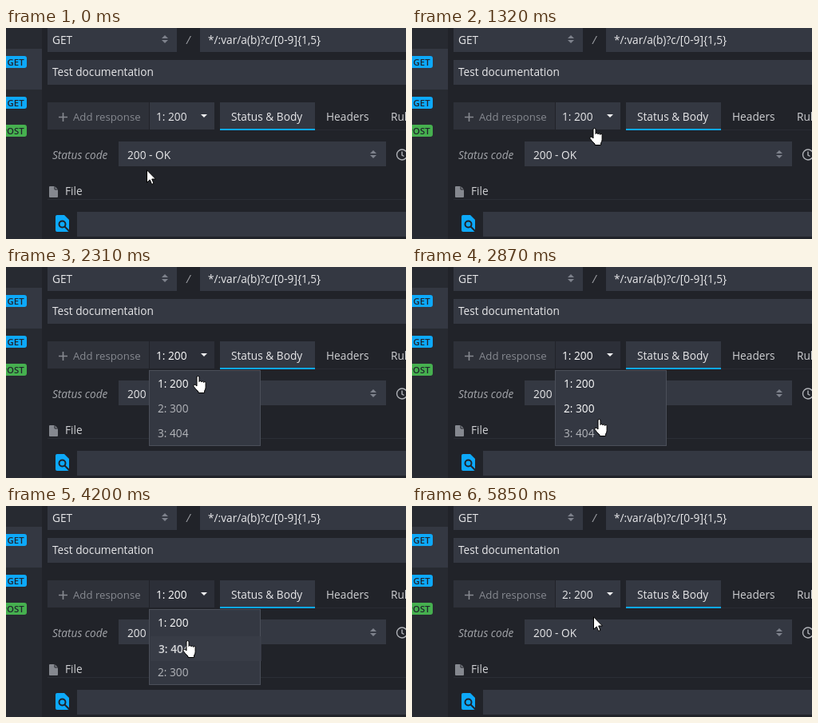
Write an HTML page that moves like this. It is 501 by 264 pixels and loops after 7160 ms.

```html
<!DOCTYPE html>
<html lang="en">
<head>
<meta charset="utf-8">
<title>Reordering responses</title>
<style>
  html, body { margin: 0; width: 100%; height: 100%; overflow: hidden; background: #212329; }
  svg { display: block; width: 501px; height: 264px; }
  text { font: 13.7px "Open Sans", "Noto Sans", sans-serif; fill: #e8e8ea; white-space: pre; }
  .field { fill: #343842; }
  .muted { font-size: 13.2px; fill: #868990; }
  .slanted { font-style: italic; fill: #a2a4a9; }
  .tab { fill: #cfd0d3; }
  .badge { font-size: 11.4px; font-weight: 600; fill: #20242c; text-anchor: end; }
  .row text { fill: #b4b6bb; }
  .row.lit text, #label.lit { fill: #fff; }
  #mirror text { fill: #fff; font-weight: 600; }
  .cursor { fill: #fff; stroke: #000; stroke-linejoin: round; }
</style>
</head>
<body>
<svg viewBox="0 0 501 264">
  <defs>
    <path id="sort" d="M0 4L4 0L8 4ZM0 6H8L4 10Z" fill="#7e828c"/>
  </defs>

  <!-- sidebar -->
  <rect width="45" height="264" fill="#272a31"/>
  <rect y="26" width="45" height="51" fill="#343842"/>
  <rect x="-8" y="35" width="34" height="15" rx="3" fill="#0da9fa"/>
  <rect x="-8" y="86" width="34" height="15" rx="3" fill="#0da9fa"/>
  <rect x="-16" y="121" width="42" height="15" rx="3" fill="#46b04f"/>
  <text class="badge" x="22.600" y="46.500">GET</text>
  <text class="badge" x="22.600" y="97.500">GET</text>
  <text class="badge" x="22.600" y="132.500">POST</text>

  <!-- route -->
  <rect class="field" x="52" y="0" width="162" height="30"/>
  <text x="58" y="20">GET</text>
  <use href="#sort" x="195" y="9"/>
  <text class="slanted" x="226" y="20">/</text>
  <rect class="field" x="243" y="0" width="258" height="30"/>
  <text x="253" y="20">*/:var/a(b)?c/[0-9]{1,5}</text>
  <rect class="field" x="52" y="40" width="449" height="31"/>
  <text x="58" y="60">Test documentation</text>

  <!-- responses and tabs -->
  <rect x="52" y="93" width="127" height="34" fill="#2e3139"/>
  <path d="M66 111.500H77M71.500 106V117" stroke="#868990" stroke-width="1.600"/>
  <text class="muted" x="84" y="116">Add response</text>
  <rect id="toggle" x="180" y="93" width="81" height="34"/>
  <text id="label" x="188" y="116"></text>
  <path d="M244 108H252L248 112Z" fill="#f2f2f3"/>
  <path d="M387 127.500H501" stroke="#292c33"/>
  <rect class="field" x="268" y="93" width="119" height="33"/>
  <rect x="268" y="126" width="119" height="2" fill="#0da9fa"/>
  <text x="282" y="116" fill="#fff">Status &amp; Body</text>
  <text class="tab" x="401" y="116">Headers</text>
  <text class="tab" x="482" y="116">Rules</text>

  <!-- status -->
  <text class="slanted" x="58" y="164">Status code</text>
  <rect class="field" x="141" y="142" width="335" height="31"/>
  <text x="152" y="164">200 - OK</text>
  <use href="#sort" x="456" y="153"/>
  <g fill="none" stroke="#b0b2b7" stroke-width="1.400">
    <circle cx="496" cy="158.500" r="6.500"/>
    <path d="M496 154.500V159L498.500 160.500"/>
  </g>

  <!-- file -->
  <path d="M54 199a1 1 0 0 1 1-1H61L65 202V211a1 1 0 0 1-1 1H55a1 1 0 0 1-1-1Z" fill="#85888f"/>
  <path d="M61 198V202H65" fill="none" stroke="#212329"/>
  <text class="tab" x="74" y="209">File</text>
  <path d="M52 214.500H501" stroke="#2b2e35"/>
  <path d="M62 236a2 2 0 0 1 2-2H73L79 240V253a2 2 0 0 1-2 2H64a2 2 0 0 1-2-2Z" fill="#0da9fa"/>
  <g fill="none" stroke="#212329" stroke-width="2">
    <circle cx="70.500" cy="245.500" r="4"/>
    <path d="M73.500 248.500L79 254"/>
  </g>
  <rect class="field" x="89" y="230" width="412" height="31"/>

  <g id="menu">
    <rect x="179.500" y="129.500" width="139" height="94" fill="#343842" stroke="#4b4f59"/>
    <g class="row"><text x="10" y="21">1: 200</text></g>
    <g class="row"><text x="10" y="21">2: 300</text></g>
    <g class="row"><text x="10" y="21">3: 404</text></g>
    <g id="mirror" opacity=".8"><rect width="139" height="31" fill="#393d48"/><text x="10" y="21">3: 404</text></g>
  </g>

  <path id="arrow" class="cursor" d="M.5 .8V16.300L4.200 12.900L6.600 18.500L9 17.400L6.700 12H11.500Z"/>
  <path id="hand" class="cursor" d="M-1 13V2a1.500 1.500 0 0 1 3 0V7.500a1.500 1.500 0 0 1 2.900 .4a1.400 1.400 0 0 1 2.700 .6a1.300 1.300 0 0 1 2.500 .8V14.500q0 2.500-1.500 4.500V21.500H1V20Q-2.500 17-5 13.300q-.7-2 .9-2.200q1.300 0 3.100 1.900Z"/>
</svg>
<script>
const LOOP = 7160, OPEN = 1660, DRAG = 3650, CLOSE = 5530;
const ROW = 31, TOP = 130, LEFT = 180, GRAB = { x: 226, y: 197 };

// Pointer moves in steps: [first step ms, last step ms, steps, x, y]
const moves = [
  [100, 780, 7, 198, 145],
  [880, 880, 1, 208, 139],
  [1000, 1440, 5, 242, 116],
  [2090, 2770, 7, 235, 185],
  [2870, 2870, 1, 234, 190],
  [2990, 3310, 4, 228, 209],
  [3540, 3650, 2, GRAB.x, GRAB.y],
  [3760, 4200, 5, 227, 168],
  [4300, 4980, 7, 228, 138],
  [CLOSE, CLOSE, 1, 228, 138],
  [5850, 5850, 1, 227, 138],
];

const $ = id => document.getElementById(id);
const rows = [...document.querySelectorAll('.row')];
const place = (el, x, y) => el.setAttribute('transform', `translate(${x} ${y})`);
const show = (el, on) => el.setAttribute('visibility', on ? 'inherit' : 'hidden');

function pointerAt(t) {
  let x = 176, y = 177;
  for (const [start, end, steps, toX, toY] of moves) {
    if (t < start) break;
    const done = end > start ? Math.floor((t - start) / (end - start) * (steps - 1) + 0.01) + 1 : steps;
    const p = Math.min(1, done / steps);
    x += (toX - x) * p;
    y += (toY - y) * p;
  }
  return { x: Math.round(x), y: Math.round(y) };
}

function render(t) {
  const { x, y } = pointerAt(t);
  const open = t >= OPEN && t < CLOSE;
  const dragging = open && t >= DRAG;

  $('label').textContent = t < CLOSE ? '1: 200' : '2: 200';
  $('label').classList.toggle('lit', open);
  $('toggle').setAttribute('fill', open ? '#2c2f38' : '#343842');
  show($('menu'), open);

  // The dragged row trades places once the pointer passes a neighbour's middle
  const order = !dragging || y >= TOP + 1.5 * ROW ? [0, 1, 2]
    : y >= TOP + 0.5 * ROW ? [0, 2, 1] : [2, 0, 1];
  const hovered = Math.floor((y - TOP) / ROW);
  order.forEach((item, slot) => {
    const row = rows[item];
    place(row, LEFT, TOP + slot * ROW);
    row.classList.toggle('lit', item === 0 || (!dragging && slot === hovered));
    row.setAttribute('opacity', dragging && item === 2 ? 0.2 : 1);
  });
  show($('mirror'), dragging);
  place($('mirror'), LEFT + x - GRAB.x, TOP + 2 * ROW + y - GRAB.y);

  const pointing = t < CLOSE && (open || y < 127);
  show($('hand'), pointing);
  show($('arrow'), !pointing);
  place($(pointing ? 'hand' : 'arrow'), x, y);
}

const begin = performance.now();
function tick() {
  render((performance.now() - begin) % LOOP);
  requestAnimationFrame(tick);
}
tick();
</script>
</body>
</html>
```
